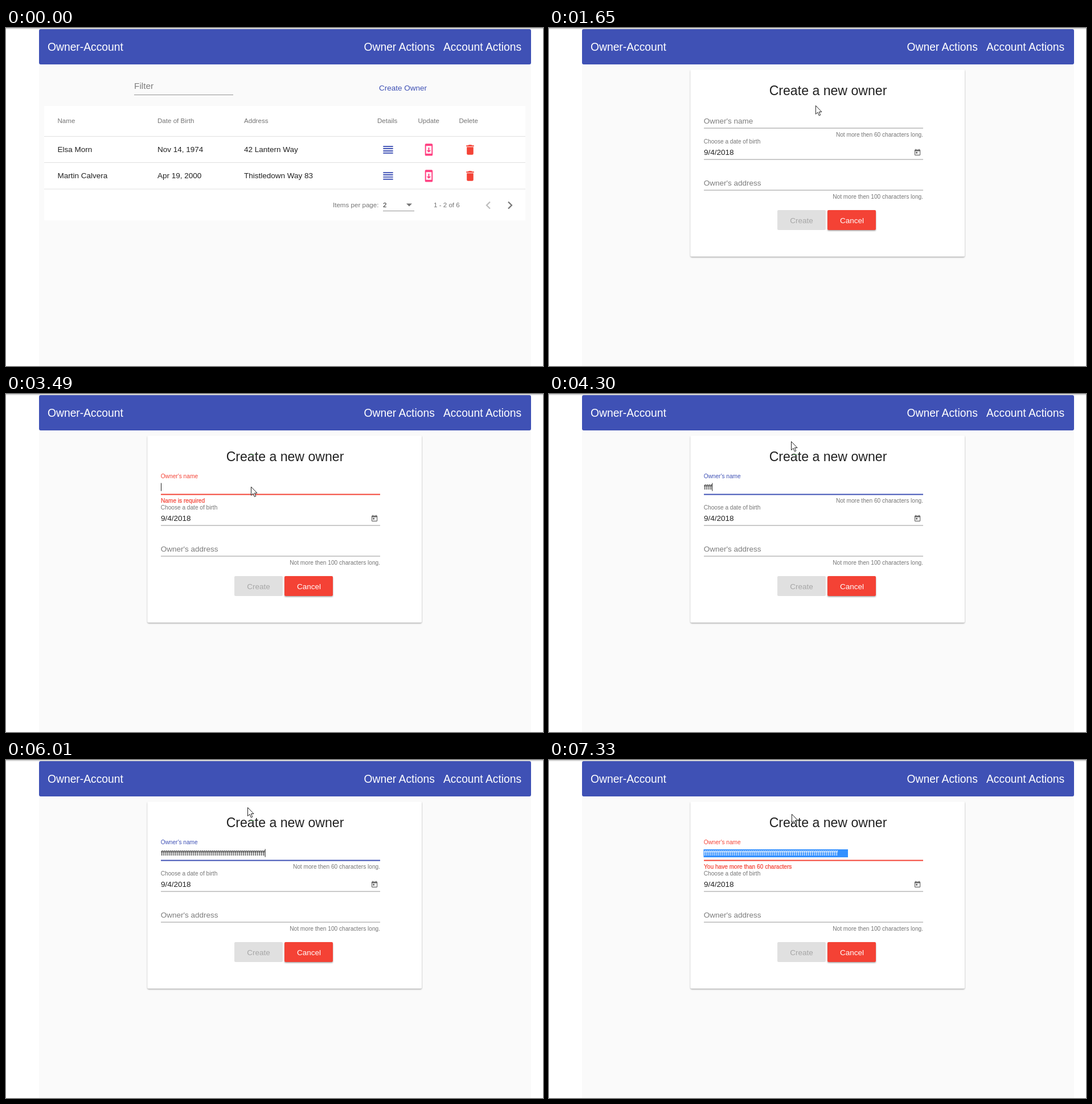
An HTML page that plays this animation: 943 by 594 pixels, repeating every 8 s.

```html
<!DOCTYPE html>
<html lang="en">
<head>
<meta charset="utf-8">
<title>Owner accounts</title>
<style>
  html, body { margin: 0; width: 100%; height: 100%; overflow: hidden; background: #fff; }
  svg { display: block; width: 943px; height: 594px; }
  text { font: 13.5px "Liberation Sans", Arial, sans-serif; fill: #212121; font-variant-ligatures: none; white-space: pre; }
  .bar text { font-size: 19.3px; fill: #fff; }
  .small text, text.small { font-size: 11.58px; fill: #757575; }
  text.tiny { font-size: 10.13px; fill: #757575; }
  text.grey { fill: #7d7d7d; }
  .end { text-anchor: end; }
  .mid { text-anchor: middle; }
  .rule { stroke: #949494; }
</style>
</head>
<body>
<svg viewBox="0 0 943 594">
  <defs>
    <filter id="shadow" x="-10%" y="-10%" width="120%" height="130%">
      <feDropShadow dx="0" dy="1.4" stdDeviation="1.1" flood-opacity=".38"/>
    </filter>
    <clipPath id="buttonClip"><rect x="640" y="88" width="114" height="35" rx="2"/></clipPath>
    <path id="details" fill="#3f51b5" d="M3 15h18v-2H3zm0 4h18v-2H3zm0-8h18V9H3zm0-6v2h18V5z"/>
    <path id="update" fill="#ff4081" d="M17 1H7a2 2 0 0 0-2 2v18a2 2 0 0 0 2 2h10a2 2 0 0 0 2-2V3a2 2 0 0 0-2-2zm0 18H7V5h10zm-1-6h-3V8h-2v5H8l4 4z"/>
    <path id="delete" fill="#f44336" d="M6 19a2 2 0 0 0 2 2h8a2 2 0 0 0 2-2V7H6zM19 4h-3.5l-1-1h-5l-1 1H5v2h14z"/>
    <path id="today" fill="#666" d="M19 3h-1V1h-2v2H8V1H6v2H5a2 2 0 0 0-2 2v14a2 2 0 0 0 2 2h14a2 2 0 0 0 2-2V5a2 2 0 0 0-2-2zm0 16H5V8h14zM7 10h5v5H7z"/>
    <g id="rowIcons">
      <use href="#details" transform="translate(659.4 2.4) scale(.965)"/>
      <use href="#update" transform="translate(730.9 2.4) scale(.965)"/>
      <use href="#delete" transform="translate(803.4 2.4) scale(.965)"/>
    </g>
  </defs>

  <path d="M0 1H943" stroke="#b0b0b0"/>
  <rect x="58" y="64" width="864" height="530" fill="#fafafa"/>
  <g class="bar">
    <rect x="58" y="2" width="864" height="62" rx="3" fill="#3f51b5"/>
    <text x="73" y="39.5">Owner-Account</text>
    <text x="628.5" y="39.5">Owner Actions</text>
    <text x="768" y="39.5">Account Actions</text>
  </g>

  <g id="listPage">
    <text x="225" y="107" class="grey" style="font-size:15.4px">Filter</text>
    <path class="rule" d="M225 117.5H399"/>
    <g clip-path="url(#buttonClip)">
      <rect id="hover" x="640" y="88" width="114" height="35" fill="#3f51b5" fill-opacity=".12"/>
      <circle id="ripple" cx="696" cy="106" fill="#3f51b5" fill-opacity=".13"/>
    </g>
    <text x="655" y="110" style="fill:#3f51b5">Create Owner</text>
    <rect x="67" y="137" width="845" height="201" fill="#fff"/>
    <path d="M67 190.5H912M67 236.5H912M67 283H912" stroke="#e0e0e0"/>
    <g class="small">
      <text x="90.5" y="167">Name</text>
      <text x="266" y="167">Date of Birth</text>
      <text x="418" y="167">Address</text>
      <text x="652" y="167">Details</text>
      <text x="723.5" y="167">Update</text>
      <text x="795.5" y="167">Delete</text>
    </g>
    <text x="90.5" y="218">Elsa Morn</text>
    <text x="266" y="218">Nov 14, 1974</text>
    <text x="418" y="218">42 Lantern Way</text>
    <use href="#rowIcons" y="200"/>
    <text x="90.5" y="264">Martin Calvera</text>
    <text x="266" y="264">Apr 19, 2000</text>
    <text x="418" y="264">Thistledown Way 83</text>
    <use href="#rowIcons" y="246"/>
    <g class="small">
      <text x="574" y="314.5">Items per page:</text>
      <text x="662" y="314.5" style="fill:#212121">2</text>
      <text x="751" y="314.5">1 - 2 of 6</text>
    </g>
    <path class="rule" d="M662 321.5H717"/>
    <path d="M703 308.5h10l-5 5z" fill="#757575"/>
    <g fill="none" stroke-width="2.2">
      <path d="M850 305.5l-6 6 6 6" stroke="#bdbdbd"/>
      <path d="M882 305.5l6 6-6 6" stroke="#757575"/>
    </g>
  </g>

  <g id="formPage">
    <rect x="248.5" y="73" width="481.5" height="328.5" rx="2" fill="#fff" filter="url(#shadow)"/>
    <text x="490" y="118" class="mid" style="font-size:23.1px">Create a new owner</text>
    <path id="speck" d="M428 106.5h8" stroke="#4caf50" stroke-opacity=".7"/>

    <text id="nameLabel" x="271.7">Owner's name</text>
    <rect id="selection" x="271.5" y="157" width="253.5" height="14" fill="#3390ff"/>
    <text id="typed" x="272" y="168"></text>
    <path id="caret" stroke="#222" d="M0 156.5v14"/>
    <path id="nameRule"/>
    <text id="nameHint" x="657" y="191" class="tiny end">Not more then 60 characters long.</text>
    <text id="nameError" x="272" class="tiny" style="fill:#f44336" stroke="#f44336" stroke-width=".25"></text>

    <text x="271.7" y="202.5" class="tiny">Choose a date of birth</text>
    <text x="272" y="223">9/4/2018</text>
    <use href="#today" transform="translate(640.2 212) scale(.57)"/>
    <path class="rule" d="M272 231H657"/>

    <text x="271.7" y="277" class="grey">Owner's address</text>
    <path class="rule" d="M272 285H657"/>
    <text x="657" y="300" class="tiny end">Not more then 100 characters long.</text>

    <rect x="401" y="320" width="85" height="35" rx="2" fill="#e0e0e0"/>
    <text x="443.5" y="342.5" class="mid" style="fill:#a6a6a6">Create</text>
    <rect x="489" y="320" width="85" height="35" rx="2" fill="#f44336" filter="url(#shadow)"/>
    <text x="532" y="342.5" class="mid" style="fill:#fff">Cancel</text>
  </g>

  <g id="pointer">
    <circle id="halo" r="12.5" fill="#f5ee2e" fill-opacity=".7"/>
    <path id="arrow" d="M.5.5V15.5L4 12.3 6.4 18 8.8 17 6.4 11.5H11z" fill="#fff" stroke="#222"/>
    <path id="hand" d="M-1.3 1.5Q.3-.8 1.8 1.5V8Q4 6.8 5 8.8 7 7.8 8 9.8 10.5 9 10.5 12V16L8.5 22H1L-4.8 13Q-5-.1-4.8 11-3 9.5-1.3 12.5z" fill="#fff" stroke="#111" stroke-linejoin="round"/>
    <path id="ibeam" d="M-3-7.5h2.5l.5.5.5-.5h2.500M0-7V7M-3 7.500h2.500L0 7l.5.5h2.500" fill="none" stroke="#4caf50" stroke-width="1.2"/>
  </g>
</svg>
<script>
const LOOP = 8000, STEP = 77.4, STEP_START = 940 % STEP;
const BLUE = '#3f51b5', RED = '#f44336';
const FORM_OPEN = 1270, FOCUS = 1950, BLUR = 2540, REFOCUS = 3200;
const FIRST_KEY = 3760, REPEAT = 4268, KEY_RATE = .0281, MAX_KEYS = 67, SELECT = 7250;

// time, x, y, pointer shape from that time on
const path = [
  [70, 894, 462, 'arrow'], [720, 691, 110, 'arrow'], [940, 697, 107, 'hand'],
  [FORM_OPEN, 697, 107, 'arrow'], [1650, 467, 136, 'arrow'], [1850, 436, 158, 'ibeam'],
  [2250, 432, 163, 'ibeam'], [2500, 434.5, 99.5, 'ibeam'], [2700, 434.5, 99.5, 'arrow'],
  [2950, 430, 160, 'ibeam'], [3400, 430, 163, 'arrow'], [3800, 425, 83, 'arrow'],
  [4400, 425, 83, 'arrow'], [5060, 424, 83, 'arrow'], [6750, 424, 83, 'arrow'],
  [6960, 423.5, 85, 'arrow'], [7330, 426, 95, 'arrow']
];
const clicks = [[1000, 1250], [2470, 2590], [3170, 3290]];

const ui = {};
document.querySelectorAll('svg [id]').forEach(node => ui[node.id] = node);

const clamp = v => Math.max(0, Math.min(1, v));
const ease = (t, start, length) => 1 - (1 - clamp((t - start) / length)) ** 5;
const show = (node, on) => node.style.display = on ? '' : 'none';
const set = (node, attrs) => { for (const key in attrs) node.setAttribute(key, attrs[key]); };

function drawPointer(t) {
  show(ui.pointer, t >= path[0][0]);
  let i = path.length - 1;
  while (i > 0 && path[i][0] > t) i--;
  const from = path[i], to = path[i + 1] || from;
  const p = to === from ? 0 : clamp((t - from[0]) / (to[0] - from[0]));
  const k = p * p * (3 - 2 * p);
  const at = n => from[n] + (to[n] - from[n]) * k;
  set(ui.pointer, { transform: `translate(${at(1)} ${at(2)})` });
  for (const shape of ['arrow', 'hand', 'ibeam']) show(ui[shape], shape === from[3]);
  show(ui.halo, clicks.some(([a, b]) => t >= a && t < b));
}

function drawList(t) {
  show(ui.hover, t >= 940);
  set(ui.ripple, { r: Math.max(0, 25 + (t - 1094) * .12) * (t >= 1000) });
}

function drawForm(t) {
  const keys = t < FIRST_KEY ? 0 : t < REPEAT ? 1
    : Math.min(MAX_KEYS, Math.round(4 + (t - REPEAT) * KEY_RATE));
  const focused = t >= FOCUS && t < BLUR || t >= REFOCUS;
  const missing = t >= BLUR && !keys, tooLong = keys > 60;
  const invalid = missing || tooLong;
  const accent = invalid ? RED : focused ? BLUE : '#7d7d7d';
  const selected = t >= SELECT;

  const lift = t < BLUR ? ease(t, FOCUS, 400)
    : t < REFOCUS ? 1 - ease(t, BLUR, 400) : ease(t, REFOCUS, 400);
  set(ui.nameLabel, { y: 168 - 20.3 * lift });
  ui.nameLabel.style.cssText = `font-size:${13.5 * (1 - .25 * lift)}px;fill:${accent}`;
  set(ui.nameRule, focused
    ? { d: 'M272 176.5H657', stroke: accent, 'stroke-width': 2 }
    : { d: 'M272 176H657', stroke: invalid ? RED : '#949494', 'stroke-width': 1.2 });

  ui.typed.textContent = 'f'.repeat(keys);
  ui.typed.style.fill = selected ? '#fff' : '';
  show(ui.selection, selected);
  show(ui.caret, focused && !selected);
  set(ui.caret, { transform: `translate(${272.5 + (keys ? ui.typed.getComputedTextLength() : 0)} 0)` });

  show(ui.nameHint, !invalid);
  show(ui.nameError, invalid);
  const reveal = clamp((t - (tooLong ? 6280 : BLUR + 110)) / 300);
  ui.nameError.textContent = tooLong ? 'You have more than 60 characters' : 'Name is required';
  set(ui.nameError, { y: 191 - 10 * (1 - reveal), opacity: reveal });
  show(ui.speck, t >= BLUR);
}

function frame(now) {
  const time = now % LOOP;
  const t = Math.floor((time - STEP_START) / STEP) * STEP + STEP_START;
  const formOpen = t >= FORM_OPEN - STEP / 2;
  show(ui.listPage, !formOpen);
  show(ui.formPage, formOpen);
  if (formOpen) drawForm(t); else drawList(t);
  drawPointer(t);
  requestAnimationFrame(frame);
}
frame(0);
</script>
</body>
</html>
```
